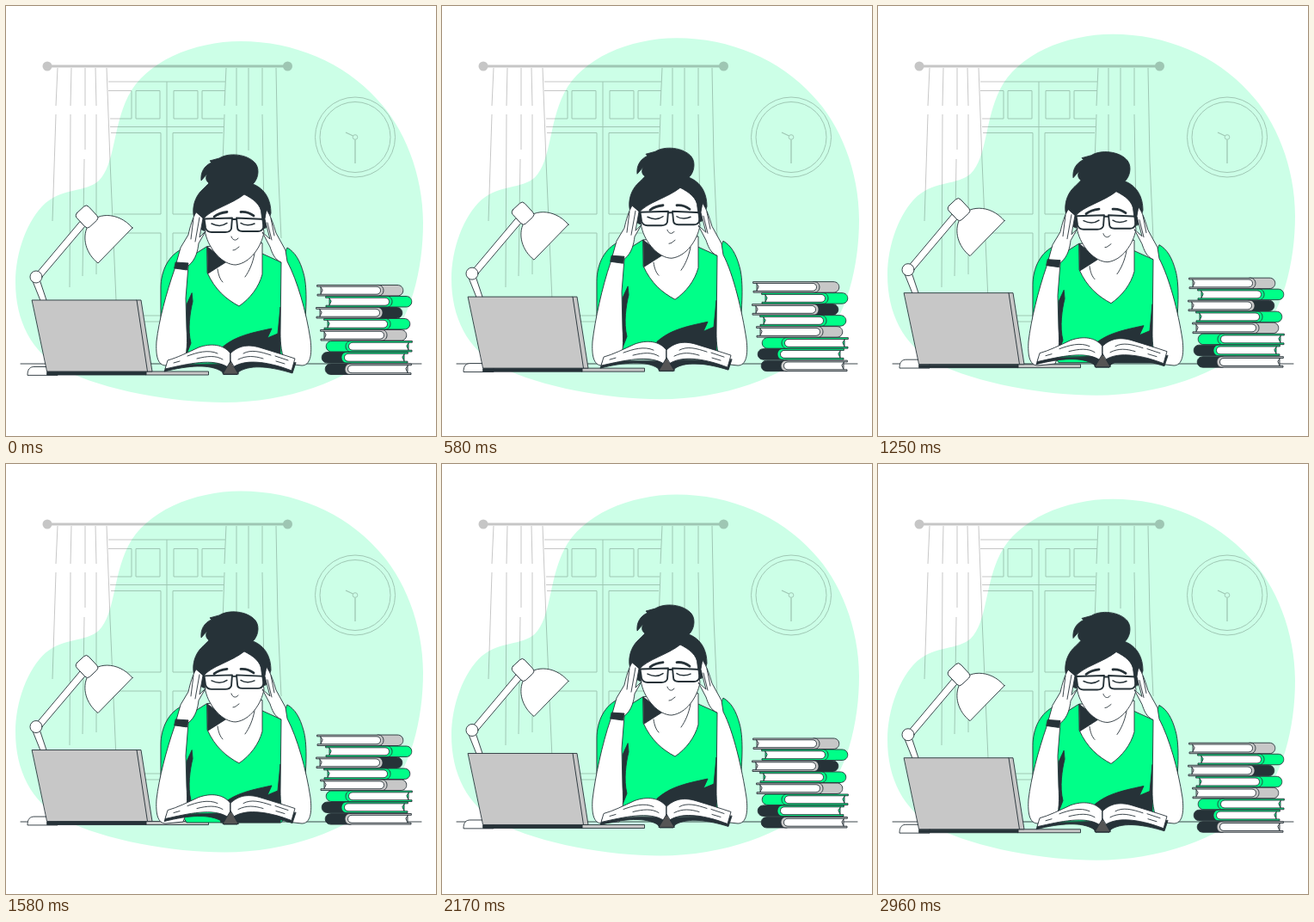
An HTML page for the animation above (3000 ms loop, 500 by 500 pixels).

```html
<!DOCTYPE html>
<html lang="en">
<head>
<meta charset="utf-8">
<title>Tired reader</title>
<style>
html, body { margin: 0; width: 100%; height: 100%; overflow: hidden; background: #fff; }
svg { display: block; width: 100%; height: 100%; }
.ink { stroke: #263238; stroke-width: .9; stroke-linejoin: round; stroke-linecap: round; }
.line { fill: none; }
.dark { fill: #263238; }
.green { fill: #00ff88; }
.grey { fill: #c7c7c7; }
.white { fill: #fff; }
</style>
</head>
<body>
<svg viewBox="0 0 500 500">
  <path class="float" fill="#ccffe7" d="M273 41C218 41 162 65 142 105C124 141 127 184 108 203C92 217 68 211 46 229C25 248 11 286 11 321C11 365 29 403 67 423C115 447 193 461 254 461C327 461 396 436 436 400C471 367 485 306 485 252C485 196 463 141 431 108C393 66 335 41 273 41Z"/>

  <g opacity=".22" fill="none" stroke="#000">
    <path stroke-width="3" d="M48 70H327"/>
    <g fill="#000" stroke="none"><circle cx="48" cy="70" r="5.500"/><circle cx="327.500" cy="70" r="5.500"/></g>
    <path d="M119 88H255M119 98.500H146V131H121M151 98.500H179V131H151ZM195 98.500H223V131H195ZM255 98.500H228V131H253M121 140.500H253M187 88V367M122 147.500H180V242H125M252 147.500H194V242H250M126 264H180V360H128M248 264H194V360H247M128 367H246"/>
    <path d="M60 72L58 116M58 126L54 250M76 72L75 116M75 126L74 327M92 72V116M92 126V167M91 178L89 314M104 72L105 116M105 126V312M117 72L121 180L128 342"/>
    <path d="M256 72L254 116M254 126L250 240M268 72V116M268 126V240M282 72V168M298 72V116M298 126L300 240M314 72L316 180L320 270"/>
    <circle cx="406" cy="152.500" r="46.500"/><circle cx="406" cy="152.500" r="41"/>
    <circle cx="406" cy="152.500" r="2.800"/>
    <path stroke-width="1.300" d="M403.500 151L395 147M406 155.500V183"/>
  </g>
  <path class="ink line" d="M17 416H483"/>

  <g class="float ink">
    <path class="white" d="M31 320L41 345H48L39 318ZM25 429C25 422 28 419.500 33 419.500H60V429Z"/>
    <path class="white" d="M36 310L86 250.500L92 256L42 315Z"/>
    <circle class="white" cx="35" cy="315" r="7"/>
    <path class="white" d="M147 258L107 299C93 288 88 270 95 256C103 240 130 238 147 258Z"/>
    <rect class="white" x="-9.500" y="-11" width="19" height="22" rx="4" transform="translate(94 245) rotate(-43)"/>
    <path class="grey" d="M163 425H235.500V429H163Z"/>
    <path class="grey" d="M152 342H157L170 425H164Z"/>
    <path class="grey" d="M30.500 342H152L164.500 425H48Z"/>
    <path class="dark" d="M48 425.500H163V429H48Z"/>
  </g>

  <g class="bob ink">
    <path class="green" d="M206 282C189 289 180 308 180 328V370L210 418H320L346 385C350 350 350 325 346 311C342 296 336 286 327 281L320 298L298 288L233 280L214 292Z"/>
    <path class="dark" d="M216 334L210 347V405L215 392C211 376 214 356 217 344ZM250 398C265 385 280 381 309 375L304 386L316 381L319 350V418H250Z"/>
    <path class="white" d="M234 280V310C243 330 256 341 271 349C284 340 294 327 298 312V276Z"/>
    <path class="dark" d="M234 280L257 297L235 311Z"/>
    <path class="line" d="M246 306C247 313 249 318 252 321M289 288C287 299 283 308 278 315"/>
    <path class="dark" d="M229 261C214 252 214 226 229 213C232 210 234 208 236 206C232 203 232 199 234 195L227 203C226 194 230 186 239 182L237 180L248 177C259 170 281 172 290 183C296 191 292 203 287 207C302 213 308 226 308 241L302 258Z"/>
    <path class="white" d="M230 247C239 236 262 231 277 219C287 224 297 231 297 242L300 263C297 280 284 299 267 301C252 301 236 283 232 265Z"/>
    <path class="line" stroke-width="2.800" d="M242 245C247 241 252 240 257 239.500M273 239.500C279 239 284 241 288 244"/>
    <path class="line" stroke-width="1.500" d="M239 253C245 256 252 256 257 252.500M273 252.500C278 256 285 255 289 253"/>
    <path class="line" stroke-width="1.900" d="M230.500 247.500L263 246.500L262 259C261 262 259 263 255 263H239C235 263 233 261 232 258ZM268 246.500L301 248L299 258C298 261 296 262 293 262H275C271 262 269 260 269 257ZM263 248H268"/>
    <path class="line" d="M262 268C263 272 267 274 270 270M264 284C267 284 268 282 271 280"/>
  </g>

  <g class="ink white"><path id="armL"/><path id="armR"/></g>
  <g class="bob ink">
    <path class="dark" d="M197.500 298L212 299L210.500 307L196 305Z"/>
    <path class="line" d="M218 247L215 271M225 246L220 274M308 247L312 267M304 252L309 272"/>
  </g>

  <g id="stack" class="float ink"></g>

  <g class="float ink">
    <path class="dark" d="M187 417L184 425C212 418 237 416 251 425L253 428.500H269L271 425C286 416 310 420 333 427L337 415Z"/>
    <path class="white" d="M261 404C253 393 238 392 224 397C211 403 199 409 188 412L185 422C212 416 241 409 258 420L261 415Z"/>
    <path class="white" d="M261 404C271 394 283 393 298 398C311 402 324 406 336 410L332 424C309 415 280 409 264 420L261 415Z"/>
    <path fill="#555" d="M261 413L252 428H270Z"/>
    <path class="line" d="M261 404V415M211 407C222 403 235 399 246 404M195 415L202 413M222 410C234 407 244 406 252 411M276 404C285 399 296 402 308 406M270 411C280 406 289 407 299 410M314 413L324 416M313 407L328 412"/>
  </g>
</svg>
<script>
const $ = id => document.getElementById(id);

// x of the open edge, top, spine fill, side of the spine (1 right, -1 left), cover fill
const books = [
  [362, 324.5, 'grey', 1, 'grey'], [372, 337.5, 'green', 1, 'green'],
  [361, 350.5, 'dark', 1, 'grey'], [370, 363.5, 'green', 1, 'green'],
  [366, 376.5, 'grey', 1, 'grey'], [472, 389.5, 'green', -1, 'green'],
  [467, 402.5, 'dark', -1, 'green'], [471, 416, 'dark', -1, 'grey']
];
$('stack').innerHTML = books.map(([x, y, spine, side, cover]) => `
  <g transform="translate(${x} ${y}) scale(${side} 1)">
    <path class="${spine}" d="M70 0H93C102 0 102 12.500 93 12.500H70Z"/>
    <path class="${cover}" d="M0 0H71C79 0 79 12.500 71 12.500H0V10.700H4V1.800H0Z"/>
    <path class="white" d="M4 1.800H69C75 1.800 75 10.700 69 10.700H4L6 6Z"/>
  </g>`).join('');

// Hands follow the head while the elbows rest on the desk.
const leftArm = y => `M221 ${240 + y}C217 ${246 + y} 214 ${257 + y} 212 ${266 + y}
  L203 ${281 + y}L196 ${306 + y}C186 ${335 + y} 178 365 175 390C174 406 176 418 186 418
  L206 416C211 404 211 390 210 375L209 ${340 + y}L212 ${302 + y}
  C221 ${295 + y} 223 ${284 + y} 224 ${276 + y}L232 ${262 + y}L225 ${269 + y}L229 ${247 + y}Z`;
const rightArm = y => `M303 ${237 + y}C308 ${244 + y} 311 ${254 + y} 314 ${264 + y}
  L325 ${284 + y}L327 ${297 + y}C339 ${320 + y} 349 355 354 388C356 405 354 418 344 418
  L326 416C320 406 319 392 319 380L320 ${298 + y}C312 ${295 + y} 309 ${286 + y} 307 ${280 + y}
  L298 ${263 + y}L307 ${271 + y}L301 ${248 + y}Z`;

const rise = (t, period) => -10 * (1 - Math.abs(1 - 2 * (t % period) / period));
const move = (name, y) => document.querySelectorAll(name)
  .forEach(el => el.setAttribute('transform', `translate(0 ${y})`));

const start = performance.now();
function draw(now) {
  const t = Math.max(0, now - start) % 3000;
  const y = rise(t, 1500);
  move('.float', rise(t, 3000));
  move('.bob', y);
  $('armL').setAttribute('d', leftArm(y));
  $('armR').setAttribute('d', rightArm(y));
  requestAnimationFrame(draw);
}
draw(start);
</script>
</body>
</html>
```
